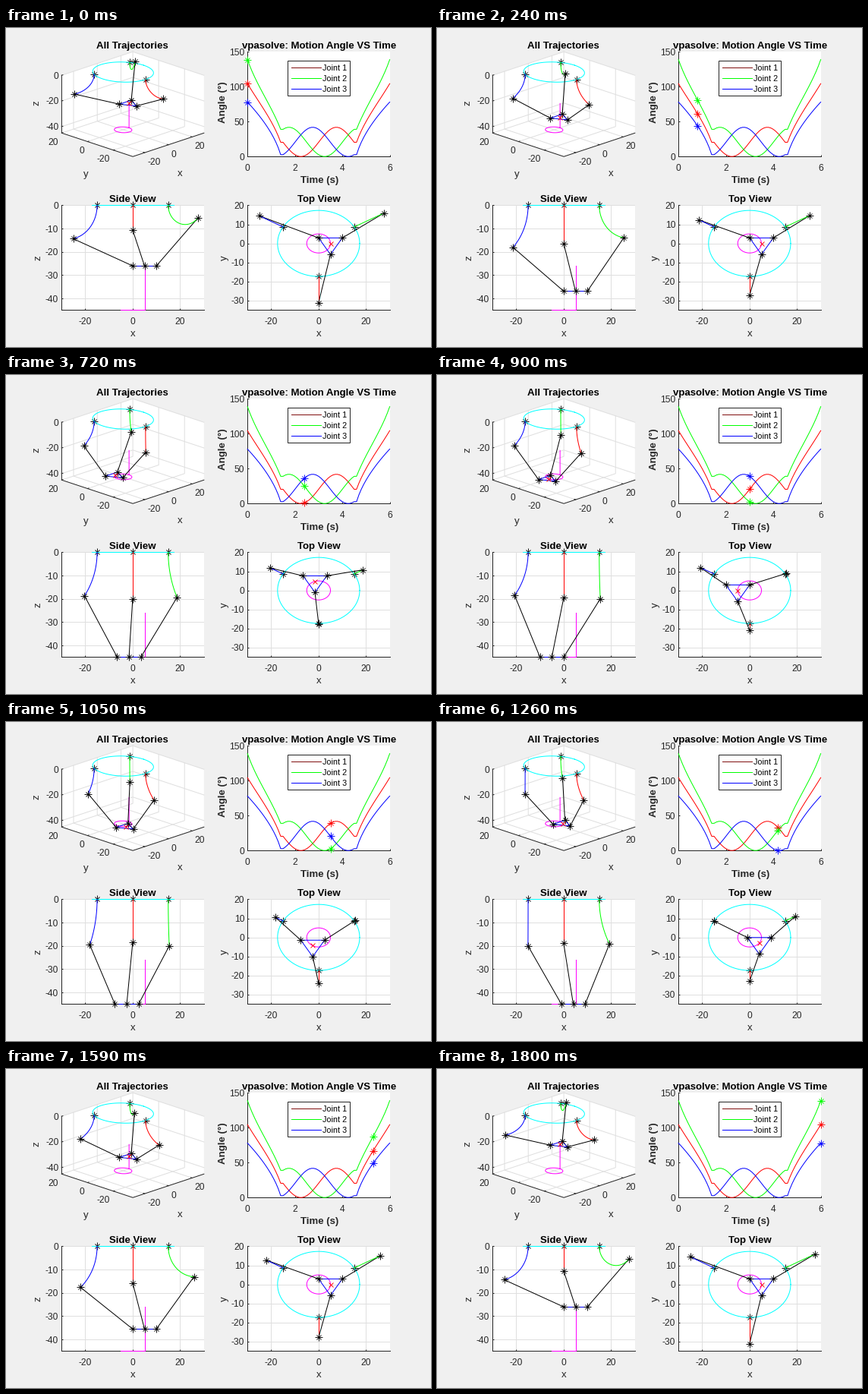
These frames come from a looping animation (560 px wide and 420 px high, 1.83 s). A matplotlib script:

```python
import numpy as np
import matplotlib.pyplot as plt
from matplotlib.animation import FuncAnimation
from matplotlib.patches import Polygon, Rectangle

W, H, DPI = 560, 420, 100
PX = 72 / DPI                      # points per pixel
INK, GRID = "#262626", "#dfdfdf"
COLORS = ["red", "lime", "blue"]
plt.rcParams["font.family"] = "Liberation Sans"

# ---- kinematics: three constant-curvature arms, rigid rods, small platform
ARM, ROD = 20, 30
BASE_R, PLAT_R, PATH_R = 30 / np.sqrt(3), 10 / np.sqrt(3), 5
TOP_Z, LOW_Z = -26, -45
N = 61
time = np.arange(N) / 10

heading = np.radians([-90, 30, 150])
out = np.stack([np.cos(heading), np.sin(heading), 0 * heading], axis=1)
down = np.array([0, 0, -1])


def ring(r, z, n=101):
    a = np.linspace(0, 2 * np.pi, n)
    return np.stack([r * np.cos(a), r * np.sin(a), 0 * a + z], axis=1)


drop = np.stack([np.full(15, PATH_R), np.zeros(15),
                 np.linspace(TOP_Z, LOW_Z, 15)], axis=1)
centre = np.vstack([drop, ring(PATH_R, LOW_Z, 31), drop[::-1]])
plate = centre[:, None] + PLAT_R * out


def bend(theta, s=1.0):
    """Outward and downward reach at fraction s of an arm bent by theta."""
    return (ARM / theta * (1 - np.cos(theta * s)),
            ARM / theta * np.sin(theta * s))


def arm_points(theta, k, s):
    r, d = bend(theta, s)
    return np.multiply.outer(BASE_R + r, out[k]) + np.multiply.outer(d, down)


def tips(theta):
    r, d = bend(theta)
    return (BASE_R + r)[..., None] * out + d[..., None] * down


lo, hi = np.full((N, 3), 1e-3), np.full((N, 3), np.pi)
for _ in range(45):
    mid = (lo + hi) / 2
    far = np.linalg.norm(tips(mid) - plate, axis=2) > ROD
    lo, hi = np.where(far, lo, mid), np.where(far, mid, hi)
theta = (lo + hi) / 2
elbow = tips(theta)
degrees = np.degrees(theta)

# ---- stage; the nudge keeps pixel snapping from rounding up
NUDGE_X, NUDGE_Y = .2, .45
fig = plt.figure(figsize=(W / DPI, H / DPI), dpi=DPI, facecolor="#f0f0f0")
stage = fig.add_axes([0, 0, 1, 1], zorder=2)
stage.set(xlim=(-NUDGE_X, W - NUDGE_X), ylim=(H - NUDGE_Y, -NUDGE_Y))
stage.axis("off")


def label(x, y, s, size=12, ha="center", bold=False, turn=False, color=INK):
    stage.text(x, y, s, fontsize=size * PX, ha=ha, va="baseline", color=color,
               weight="bold" if bold else "normal",
               rotation=90 if turn else 0, rotation_mode="anchor")


def title(x, y, s):
    label(x, y, s, 13.2, bold=True, color="black")


def panel(left, top, xlim, ylim, xticks, yticks, grid=True):
    w, h = 187.4, 138
    ax = fig.add_axes([(left + NUDGE_X) / W, 1 - (top + h + NUDGE_Y) / H,
                       w / W, h / H])
    ax.set(xlim=xlim, ylim=ylim, xticks=xticks, yticks=yticks)
    ax.tick_params(direction="in", length=2 * PX, width=PX, color=INK,
                   labelbottom=False, labelleft=False)
    ax.spines[["top", "right"]].set_visible(False)
    ax.spines[["left", "bottom"]].set(color=INK, linewidth=PX)
    if grid:
        ax.grid(color=GRID, linewidth=PX)
        ax.set_axisbelow(True)
    for v in xticks:
        x = left + w * (v - xlim[0]) / (xlim[1] - xlim[0])
        label(x, top + h + 18.5, str(v))
    for v in yticks:
        y = top + h * (ylim[1] - v) / (ylim[1] - ylim[0])
        label(left - 4, y + 4.4, str(v), ha="right")
    return ax


def line(ax, pts, color):
    return ax.plot(*np.transpose(pts), color=color, lw=PX, zorder=3,
                   clip_on=False)[0]


def mark(ax, color, marker, size, z=4):
    return ax.plot([], [], ls="none", marker=marker, ms=size * PX, color=color,
                   mew=.9 * PX, zorder=z, clip_on=False)[0]


class Star:
    """An upright cross with a smaller diagonal one."""

    def __init__(self, ax, color, z=4):
        self.parts = [mark(ax, color, "+", 10, z), mark(ax, color, "x", 6, z)]

    def set_data(self, x, y):
        for part in self.parts:
            part.set_data(x, y)


# ---- projections
def iso(p):
    x, y, z = np.moveaxis(np.asarray(p, float), -1, 0)
    u, v, w = (x + 30) / 60, (y + 35) / 55, (z + 45) / 45
    return np.stack([166.9 + 93.7 * (u - v),
                     168.8 - 31 * (u + v) - 76 * w], axis=-1)


def side(p):
    return np.asarray(p)[..., [0, 2]]


def plan(p):
    return np.asarray(p)[..., [0, 1]]


# ---- 3D box
def box_line(*pts, color=GRID):
    stage.plot(*iso(pts).T, color=color, lw=PX, zorder=1)


stage.add_patch(Polygon(iso([(-30, -35, -45), (30, -35, -45), (30, -35, 0),
                             (30, 20, 0), (-30, 20, 0), (-30, 20, -45)]),
                        color="white", lw=0, zorder=0))
for x in (-20, 0, 20):
    box_line((x, -35, -45), (x, 20, -45), (x, 20, 0))
    box_line((x, -35, -45), (x, -34, -45), color=INK)
    u, v = iso((x, -35, -45))
    label(u + 3.5, v + 16, str(x), ha="left")
for y in (-20, 0, 20):
    box_line((-30, y, -45), (30, y, -45), (30, y, 0))
    box_line((-30, y, -45), (-29, y, -45), color=INK)
    u, v = iso((-30, y, -45))
    label(u - 4.5, v + 15.5, str(y), ha="right")
for z in (-40, -20, 0):
    box_line((-30, 20, z), (30, 20, z), (30, -35, z))
    box_line((-30, 20, z), (-29, 20, z), color=INK)
    u, v = iso((-30, 20, z))
    label(u - 4, v + 4.4, str(z), ha="right")
box_line((-30, 20, 0), (-30, 20, -45), (-30, -35, -45), (30, -35, -45),
         color=INK)

# ---- flat panels
graph = panel(318, 31, (0, 6), (0, 150), range(0, 7, 2), range(0, 151, 50),
              grid=False)
front = panel(73, 233, (-30, 30), (-45, 0), (-20, 0, 20), range(-40, 1, 10))
above = panel(318, 233, (-30, 30), (-35, 20), (-20, 0, 20), range(-30, 21, 10))

title(166.5, 26.5, "All Trajectories")
title(412.5, 26.5, "vpasolve: Motion Angle VS Time")
title(166.5, 228.5, "Side View")
title(412.5, 228.5, "Top View")
label(228.5, 194.5, "x", 13.2)
label(105, 195.5, "y", 13.2)
label(43.5, 98.5, "z", 13.2, turn=True)
label(167, 405.5, "x", 13.2)
label(45.5, 302, "z", 13.2, turn=True)
label(412, 405.5, "x", 13.2)
label(291, 302, "y", 13.2, turn=True)
label(413, 203.5, "Time (s)", 13.2, bold=True)
label(288.5, 97, "Angle (°)", 13.2, bold=True, turn=True)

# ---- angle curves and legend
for k, c in enumerate(COLORS):
    line(graph, np.stack([time, degrees[:, k]], axis=1), c)
dots = [Star(graph, c) for c in COLORS]

stage.add_patch(Rectangle((371, 43), 82, 46, fc="white", ec=INK, lw=PX,
                          zorder=5))
for k, c in enumerate(["#801010", "lime", "blue"]):
    y = 52 + 14 * k
    stage.plot([376, 415], [y, y], color=c, lw=PX, zorder=6)
    stage.text(416.5, y + 4, f"Joint {k + 1}", fontsize=10.8 * PX,
               color="black", zorder=6)


# ---- the robot, drawn once per view
class Robot:
    def __init__(self, ax, proj, cross=True):
        self.proj = proj
        self.put(Star(ax, "black", z=2.9), BASE_R * out)
        line(ax, proj(ring(BASE_R, 0)), "cyan")
        line(ax, proj(np.vstack([drop, ring(PATH_R, LOW_Z)])), "magenta")
        blank = np.zeros((0, 2))
        self.rods = [line(ax, blank, "black") for _ in COLORS]
        self.arms = [line(ax, blank, c) for c in COLORS]
        self.plate = line(ax, blank, "blue")
        self.joints = Star(ax, "black")
        self.cross = mark(ax, "red", "x", 6) if cross else None

    def put(self, artist, pts):
        artist.set_data(*self.proj(pts).T)

    def pose(self, i):
        s = np.linspace(0, 1, 25)
        for k in range(3):
            self.put(self.arms[k], arm_points(theta[i, k], k, s))
            self.put(self.rods[k], np.stack([elbow[i, k], plate[i, k]]))
        self.put(self.plate, plate[i][[0, 1, 2, 0]])
        self.put(self.joints, np.vstack([elbow[i], plate[i]]))
        if self.cross:
            self.put(self.cross, centre[i:i + 1])


robots = [Robot(stage, iso), Robot(front, side, cross=False),
          Robot(above, plan)]


def draw(i):
    for robot in robots:
        robot.pose(i)
    for k, dot in enumerate(dots):
        dot.set_data([time[i]], [degrees[i, k]])
    return []


anim = FuncAnimation(fig, draw, frames=N, interval=30, repeat=True)
plt.show()
```
